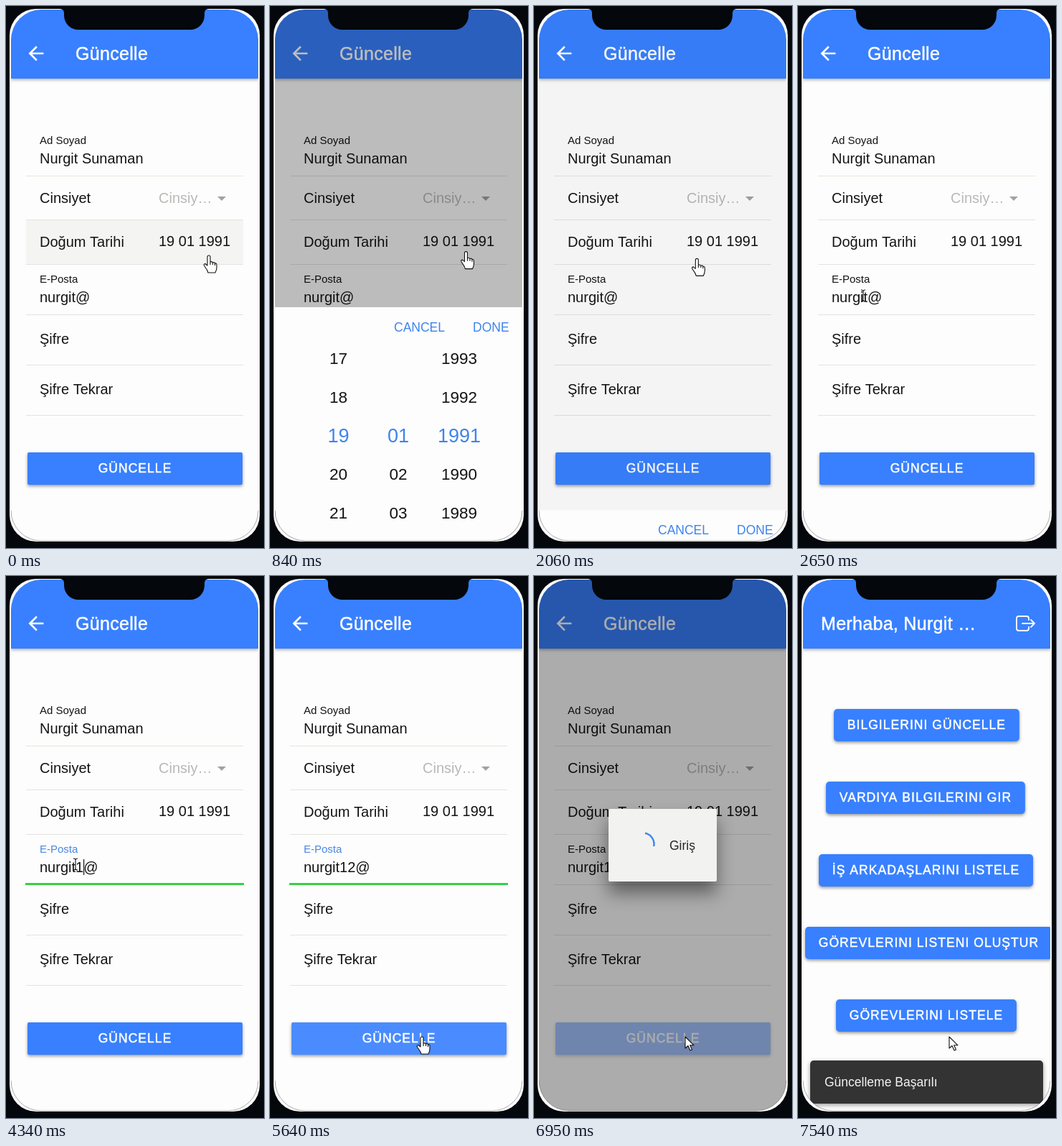
Recreate the animation shown at these times as an HTML page with a canvas. Size 360x754 px, loop 8000 ms.

```html
<!DOCTYPE html>
<html lang="tr">
<head>
<meta charset="utf-8">
<title>Güncelle</title>
<style>
  html, body { margin: 0; width: 100%; height: 100%; overflow: hidden; background: #04070c; }
  canvas { display: block; width: 360px; height: 754px; }
</style>
</head>
<body>
<canvas id="stage"></canvas>
<script>
const W = 360, H = 754, LOOP = 8000;
const BLUE = '#3880ff', INK = '#141414', PAPER = '#fdfdfd', FRAME = '#04070c';
const FIRST = 'Nurgit', FULL = FIRST + ' Sunaman', MAIL = FIRST.toLowerCase();
const FONT = '"Liberation Sans", Arial, sans-serif';

const dpr = window.devicePixelRatio || 1;
function setUp(canvas) {
  canvas.width = W * dpr;
  canvas.height = H * dpr;
  const ctx = canvas.getContext('2d');
  ctx.scale(dpr, dpr);
  return ctx;
}
const stage = setUp(document.getElementById('stage'));
const layerCanvas = document.createElement('canvas');
const layer = setUp(layerCanvas);
let c = stage; // context being drawn on

const clamp = v => Math.max(0, Math.min(1, v));
const ramp = (t, from, to) => clamp((t - from) / (to - from));
const easeOut = p => 1 - (1 - p) ** 4;
const easeInOut = p => p * p * (3 - 2 * p);

function text(str, x, y, size, color = INK, spacing = 0, align = 'left') {
  c.font = size + 'px ' + FONT;
  c.letterSpacing = spacing + 'px';
  c.textAlign = align;
  c.fillStyle = color;
  c.fillText(str, x, y);
}

// Medium weight: regular letters with a hairline outline.
function mediumText(str, x, y, size, spacing) {
  text(str, x, y, size, '#fff', spacing);
  c.strokeStyle = '#fff';
  c.lineWidth = 0.5;
  c.strokeText(str, x, y);
}

function widthOf(str, size, spacing = 0) {
  c.font = size + 'px ' + FONT;
  c.letterSpacing = spacing + 'px';
  return c.measureText(str).width;
}

function rect(x, y, w, h, color) {
  c.fillStyle = color;
  c.fillRect(x, y, w, h);
}

function box(x, y, w, h, r, color) {
  c.beginPath();
  c.roundRect(x, y, w, h, r);
  c.fillStyle = color;
  c.fill();
}

function shadow(blur, dy, alpha) {
  c.shadowBlur = blur * dpr;
  c.shadowOffsetY = dy * dpr;
  c.shadowColor = `rgba(0,0,0,${alpha})`;
}
const noShadow = () => shadow(0, 0, 0);

function stroke(path, color, width) {
  c.strokeStyle = color;
  c.lineWidth = width;
  c.stroke(new Path2D(path));
}

function header(title, x) {
  rect(7, 5, 345, 739, PAPER);
  shadow(4, 2, 0.3);
  rect(7, 5, 345, 96, BLUE);
  noShadow();
  mediumText(title, x, 75, 25, 0.31);
}

function button(label, x, y, w, r, color) {
  shadow(4, 2, 0.4);
  box(x, y, w, 45, r, color);
  noShadow();
  mediumText(label, x + (w - widthOf(label, 17.5, 1.05)) / 2, y + 28, 17.5, 1.05);
}

// --- pages ---

const BACK = new Path2D('M20 11H7.83l5.59-5.59L12 4l-8 8 8 8 1.41-1.41L7.83 13H20v-2z');

function drawForm(t) {
  header('Güncelle', 97);
  c.save();
  c.translate(26.2, 50.3);
  c.scale(1.31, 1.31);
  c.fillStyle = '#fff';
  c.fill(BACK);
  c.restore();

  c.globalAlpha = 1 - ramp(t, 200, 420);
  rect(28, 297, 303, 62, '#f4f4f2');
  c.globalAlpha = 1;
  for (const y of [236, 297, 359, 429, 499, 569]) rect(28, y, 303, 1, '#e3e3de');

  text('Ad Soyad', 47, 192, 15);
  text(FULL, 47, 219, 20);
  text('Cinsiyet', 47, 274, 20);
  text('Cinsiy…', 213, 274, 20, '#b8b8b6');
  c.fillStyle = '#a2a2a0';
  c.fill(new Path2D('M295 265h12l-6 6z'));
  text('Doğum Tarihi', 47, 335, 20);
  text('19 01 1991', 213, 334, 20);

  const focus = ramp(t, 3040, 3240) * (1 - ramp(t, 6230, 6380));
  text('E-Posta', 47, 385, 15, focus > 0.5 ? '#4a86e0' : INK);
  const typed = MAIL + (t >= 4720 ? '12' : t >= 4210 ? '1' : '');
  text(typed + '@', 47, 412, 20);
  if (focus) {
    const h = 3 * focus;
    rect(27, 430 - h, 305, h, '#38d043');
    const blinkFrom = t >= 4720 ? 4720 : t >= 4210 ? 4210 : 3210;
    const caretOn = t >= 3210 && t < 6220 && Math.floor((t - blinkFrom) / 500) % 2 === 0;
    if (caretOn) rect(Math.round(47 + widthOf(typed, 20)), 394, 1.2, 22, INK);
  }

  text('Şifre', 47, 470, 20);
  text('Şifre Tekrar', 47, 540, 20);

  // The button is half transparent once pressed.
  const pressed = ramp(t, 6200, 6450);
  button('GÜNCELLE', 30, 621, 300, 2, t >= 5540 ? '#4a8cff' : BLUE);
  c.globalAlpha = 0.5 * pressed;
  rect(26, 617, 308, 56, PAPER);
  c.globalAlpha = 1;
}

const MENU = [
  ['BILGILERINI GÜNCELLE', 50],
  ['VARDIYA BILGILERINI GIR', 39],
  ['İŞ ARKADAŞLARINI LISTELE', 29],
  ['GÖREVLERINI LISTENI OLUŞTUR', 10],
  ['GÖREVLERINI LISTELE', 53]
];

function drawHome() {
  header('Merhaba, ' + FIRST + ' …', 32);
  c.lineCap = c.lineJoin = 'round';
  stroke('M322 61V59a3 3 0 0 0-3-3H308a3 3 0 0 0-3 3V73a3 3 0 0 0 3 3H319a3 3 0 0 0 3-3V71M313 66H330M325 61l5 5-5 5', '#fff', 1.8);
  MENU.forEach(([label, x], i) =>
    button(label, x, 185 + 101 * i, widthOf(label, 17.5, 1.05) + 37.5, 5, BLUE));
}

// --- overlays ---

function drawPicker(open) {
  c.save();
  c.translate(0, 325 * (1 - open));
  rect(7, 419, 345, 326, PAPER);
  text('CANCEL', 173, 453, 17.5, '#3f84ec');
  text('DONE', 283, 453, 17.5, '#3f84ec');
  for (let row = -2; row <= 2; row++) {
    const size = row ? 22.5 : 27, color = row ? INK : '#3f84ec';
    const y = 597.5 + 53.7 * row + size * 0.358;
    text(19 + row, 95.5, y, size, color, 0, 'center');
    if (row >= 0) text('0' + (1 + row), 179, y, size, color, 0, 'center');
    text(1991 - row, 264, y, size, color, 0, 'center');
  }
  c.restore();
}

function drawLoading(t, show, leaving) {
  const s = leaving ? 1 - 0.1 * (1 - show) : 1.1 - 0.1 * show;
  c.save();
  c.globalAlpha = show;
  c.translate(179.5, 374.5);
  c.scale(s, s);
  c.translate(-179.5, -374.5);
  shadow(25, 16, 0.45);
  box(104, 324, 151, 101, 2, '#f2f2f0');
  noShadow();
  const a = Math.PI * (1 + 2 * (t - 6740) / 750);
  c.beginPath();
  c.arc(152, 373, 15.5, a, a + Math.PI / 2);
  c.strokeStyle = '#3f88ee';
  c.lineWidth = 2.5;
  c.lineCap = 'butt';
  c.stroke();
  text('Giriş', 189, 381, 17.5, '#262626');
  c.restore();
}

function drawToast(show) {
  c.globalAlpha = show;
  shadow(6, 2, 0.4);
  box(17, 674, 325, 60, 5, '#333');
  noShadow();
  text('Güncelleme Başarılı', 37, 710, 17.5, '#f4f4f4');
  c.globalAlpha = 1;
}

// --- mouse pointer ---

const STOPS = [ // time, x, y
  [130, 282, 347], [1390, 266, 338], [1600, 264, 337], [1850, 264, 337],
  [2550, 91, 403], [2690, 91, 403], [2860, 97, 401], [4880, 97, 401], [5560, 211, 641]
];
const HAND = new Path2D('M-1 2Q-1 0 1 0Q3 0 3 2V9Q5.5 8 6.5 10Q9 9 9.5 11Q12 10.5 12 13V17Q12 20 10 24H0Q-1 20-5 15Q-7 12-4 11.5L-1 14ZM3 9V13M6.5 10V13M9.5 11V14');
const ARROW = new Path2D('M0 0V16L4 12.5L7 19L9.5 18L6.7 11.8H12Z');
const BEAM = 'M-3-8Q0-8 0-6Q0-8 3-8M0-6V6M-3 8Q0 8 0 6Q0 8 3 8';

function pointerAt(t) {
  const next = STOPS.findIndex(s => s[0] > t);
  if (next === 0) return STOPS[0].slice(1);
  if (next < 0) return STOPS[STOPS.length - 1].slice(1);
  const a = STOPS[next - 1], b = STOPS[next];
  const p = easeInOut(ramp(t, a[0], b[0]));
  return [a[1] + (b[1] - a[1]) * p, a[2] + (b[2] - a[2]) * p];
}

function pointerKind(t, y) {
  if (t < 2150) return 'hand';
  if (t >= 6230) return 'arrow';
  if (y >= 621) return 'hand';
  return y >= 362 && y < 570 ? 'beam' : 'arrow';
}

function drawPointer(t) {
  const [x, y] = pointerAt(t), kind = pointerKind(t, y);
  c.save();
  c.translate(x, y);
  c.lineJoin = 'round';
  if (kind === 'beam') {
    stroke(BEAM, '#111', 1.1);
  } else {
    const shape = kind === 'hand' ? HAND : ARROW;
    c.fillStyle = '#fff';
    c.fill(shape);
    c.strokeStyle = '#111';
    c.lineWidth = 1.1;
    c.stroke(shape);
  }
  c.restore();
}

// --- whole picture ---

function drawScreen(t) {
  const pop = easeInOut(ramp(t, 7220, 7430));
  if (pop > 0) drawHome();
  if (pop < 1) {
    c = layer;
    c.clearRect(0, 0, W, H);
    drawForm(t);
    c = stage;
    c.globalAlpha = 1 - pop;
    c.drawImage(layerCanvas, 0, 40 * pop, W, H);
    c.globalAlpha = 1;
  }

  const picker = easeOut(ramp(t, 350, 850)) * (1 - easeOut(ramp(t, 1870, 2350)));
  const loadIn = ramp(t, 6250, 6450), loadOut = ramp(t, 7050, 7230);
  const loading = easeInOut(loadIn) * (1 - easeInOut(loadOut));
  const dim = Math.max(picker * 0.26, loading * 0.32);
  if (dim) rect(7, 5, 345, 740, `rgba(0,0,0,${dim})`);
  if (picker) drawPicker(picker);
  if (loading) drawLoading(t, loading, loadOut > 0);

  const toast = ramp(t, 7280, 7520);
  if (toast) drawToast(toast);
}

function draw(t) {
  c = stage;
  rect(0, 0, W, H, FRAME);
  box(5, 4, 349, 741, 37, '#fdfdfd');
  c.save();
  c.beginPath();
  c.roundRect(7, 5, 345, 739, 42);
  c.clip();
  drawScreen(t);
  c.restore();
  stroke('M7 702A42 42 0 0 0 49 744H310A42 42 0 0 0 352 702', 'rgba(0,0,0,.4)', 0.8);
  c.fillStyle = FRAME;
  c.fill(new Path2D('M75 0V4Q81 4 81 10V13A20 20 0 0 0 101 33H257A20 20 0 0 0 277 13V10Q277 4 283 4V0Z'));
  drawPointer(t);
}

const start = performance.now();
function tick() {
  draw((performance.now() - start) % LOOP);
  requestAnimationFrame(tick);
}
tick();
</script>
</body>
</html>
```
